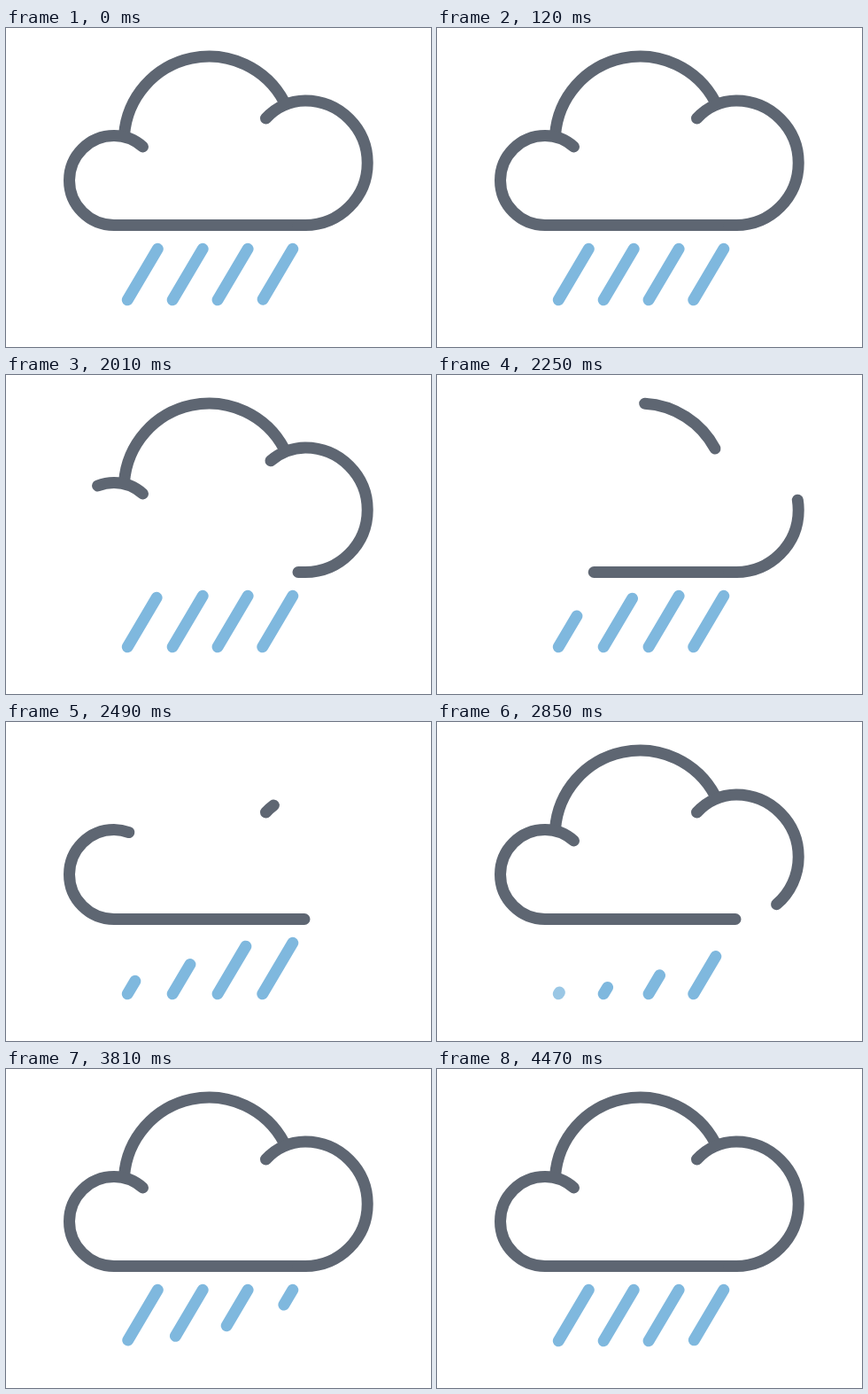
These frames come from a looping animation (480 by 360 pixels, 4500 ms). An HTML page without scripts:

```html
<!DOCTYPE html>
<html lang="en">
<head>
<meta charset="utf-8">
<title>Rain cloud</title>
<style>
  html, body { margin: 0; width: 100%; height: 100%; overflow: hidden; background: #fff; }
  svg { display: block; width: 100vw; height: 100vh; }
  path {
    fill: none;
    stroke-width: 13;
    stroke-linecap: round;
    stroke-dasharray: 1 2;
    animation: 4500ms linear infinite;
  }
  .cloud { stroke: #5e6672; }
  .rain { stroke: #7fb8de; }

  .base { animation-name: base; }
  .crown { animation-name: crown; }
  .side { animation-name: side; }
  .rain path {
    animation-name: fall, fade;
    animation-delay: calc(-2530ms + var(--i) * 225ms);
  }

  /* Each stroke wipes off from its start, then draws in again */
  @keyframes base {
    0%, 34% { stroke-dashoffset: 0; }
    46.33% { stroke-dashoffset: -1; }
    46.34% { stroke-dashoffset: .999; }
    55.78%, 100% { stroke-dashoffset: 0; }
  }
  @keyframes crown {
    0%, 44.67% { stroke-dashoffset: 0; }
    54.44% { stroke-dashoffset: -1.1; }
    55.56% { stroke-dashoffset: -1.9; }
    55.57% { stroke-dashoffset: 1.1; }
    63.11%, 100% { stroke-dashoffset: 0; }
  }
  @keyframes side {
    0%, 44.4% { stroke-dashoffset: 0; }
    54.9% { stroke-dashoffset: -1; }
    54.91% { stroke-dashoffset: .999; }
    65.56%, 100% { stroke-dashoffset: 0; }
  }
  @keyframes fall {
    0% { stroke-dashoffset: 0; animation-timing-function: cubic-bezier(.28, .2, .43, .97); }
    21.33% { stroke-dashoffset: -.98; }
    21.34% { stroke-dashoffset: .999; animation-timing-function: ease; }
    44.44%, 100% { stroke-dashoffset: 0; }
  }
  @keyframes fade {
    0%, 19.1% { opacity: 1; }
    21.33% { opacity: 0; }
    22.4%, 100% { opacity: 1; }
  }
</style>
</head>
<body>
<svg viewBox="0 0 480 360">
  <g class="cloud">
    <path class="crown" pathLength="1" d="M133.5 121A96 96 0 0 1 314 83"/>
    <path class="base" pathLength="1" d="M337 222.5H122A50.5 50.5 0 0 1 122 121.5A49 49 0 0 1 154.5 134"/>
    <path class="side" pathLength="1" d="M293.5 102A62 62 0 0 1 338 82A70.25 70.25 0 0 1 338 222.5H330"/>
  </g>
  <g class="rain">
    <path style="--i:0" pathLength="1" d="M171.3 249.3L137.3 306.8"/>
    <path style="--i:1" pathLength="1" d="M222.2 249.3L188.2 306.8"/>
    <path style="--i:2" pathLength="1" d="M273.1 249.3L239.1 306.8"/>
    <path style="--i:3" pathLength="1" d="M323.8 249.3L289.8 306.8"/>
  </g>
</svg>
</body>
</html>
```
